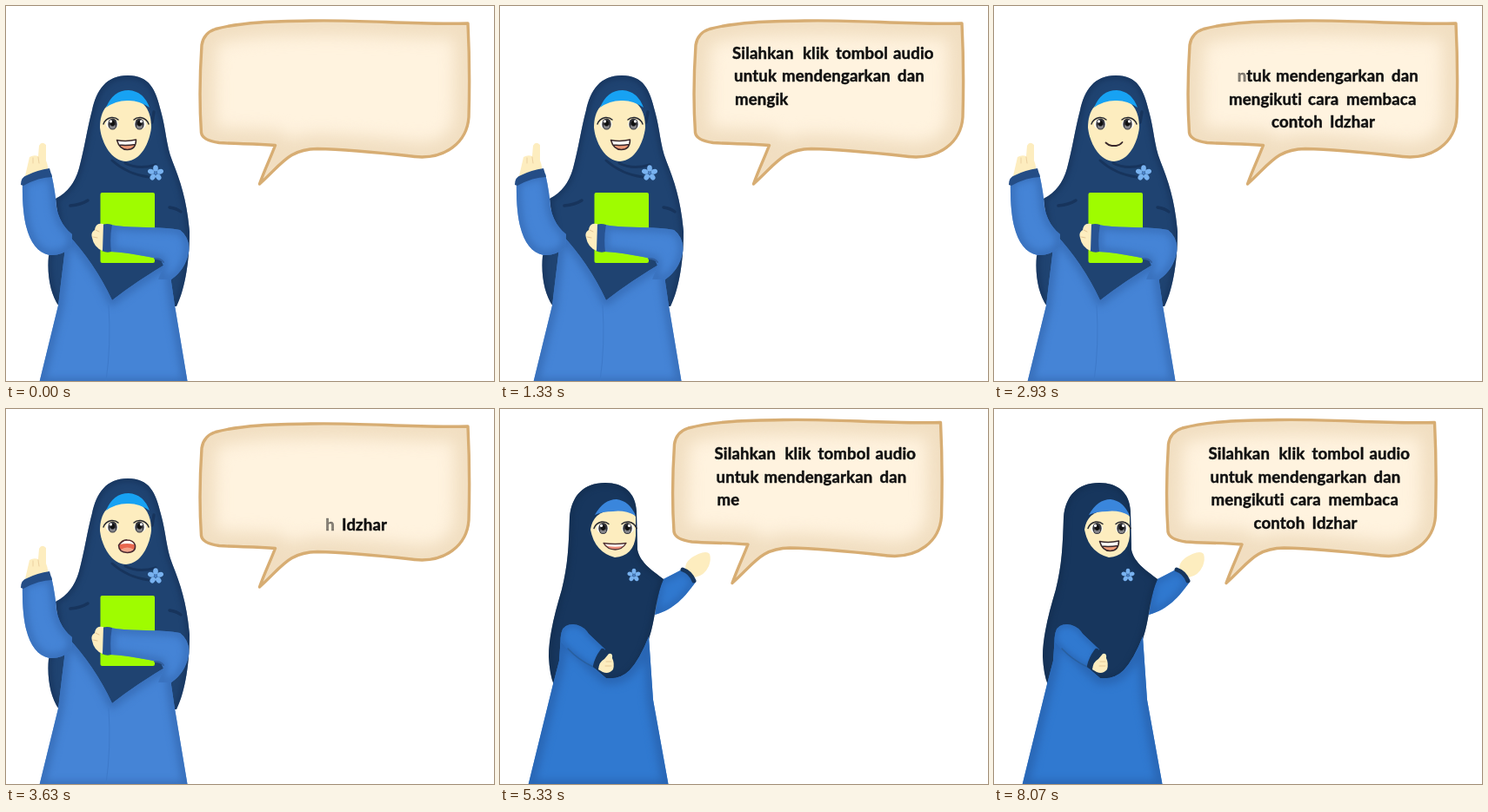
An HTML page that plays this animation: 561x432 px, repeating every 8.11 s.

```html
<!DOCTYPE html>
<html lang="id">
<head>
<meta charset="utf-8">
<style>
html, body { margin: 0; width: 100%; height: 100%; overflow: hidden; background: #fff; }
svg { display: block; width: 561px; height: 432px; }
text { font: 700 18.6px Lato, "Open Sans", sans-serif; letter-spacing: .15px; fill: #111; stroke: #111; stroke-width: .45px; stroke-linejoin: round; }
</style>
</head>
<body>
<svg id="stage" viewBox="0 0 561 432" fill="none" stroke-linecap="round" stroke-linejoin="round"></svg>
<script>
const LOOP = 8110, SWITCH = 3740, SKIN = '#fdedbf', INK = '#24262e';
let clips = 0;

const shape = (d, fill) => `<path d="${d}" fill="${fill}"/>`;
const line = (d, color, width) => `<path d="${d}" stroke="${color}" stroke-width="${width}"/>`;
const oval = (x, y, rx, ry, fill) => `<ellipse cx="${x}" cy="${y}" rx="${rx}" ry="${ry}" fill="${fill}"/>`;

// A filled shape with a blurred darker rim
function soft(d, fill, rim, width = 12, blur = 4) {
  const id = 'clip' + clips++;
  return `<clipPath id="${id}"><path d="${d}"/></clipPath>${shape(d, fill)}
    <g clip-path="url(#${id})"><path d="${d}" stroke="${rim}" stroke-width="${width}" style="filter:blur(${blur}px)"/></g>`;
}

function flower(x, y, r) {
  let petals = '';
  for (let i = 0; i < 5; i++)
    petals += `<ellipse cy="${-r * .62}" rx="${r * .32}" ry="${r * .42}" fill="#78b2f0" transform="rotate(${i * 72})"/>`;
  return `<g transform="translate(${x} ${y})">${petals}<circle r="${r * .2}" fill="#4c83c8"/></g>`;
}

function eyes(left, right, y) {
  const open = (x, s) => `<g transform="translate(${x} ${y}) scale(${s} 1)">
    ${oval(0, .5, 7, 6, '#fffdf7')}${oval(.5, .5, 5.2, 6.6, '#33343b')}${oval(.5, 3.2, 3.4, 2.8, '#85858a')}
    ${oval(.5, -.3, 2.6, 3.2, '#111')}${oval(-1.5, -2.6, 1.6, 1.6, '#fff')}
    ${line('M-10 .5Q-8 -5.5 -1 -7Q4 -7.5 7 -4.5', INK, 1.4)}</g>`;
  const shut = (x, s) => `<g transform="translate(${x} ${y}) scale(${s} 1)">
    ${line('M-10 0Q-1 7 8 1', INK, 1.9)}</g>`;
  return `<g class="open">${open(left, 1)}${open(right, -1)}</g>
    <g class="shut">${shut(left, 1)}${shut(right, -1)}</g>`;
}

const MOUTHS = {
  O: shape('M-11 -4.5Q0 -2.5 11 -5Q11 6.5 1 6.5Q-8 6.5 -11 -4.5Z', '#ef9c78') +
     shape('M-11 -4.5Q0 -2.5 11 -5L10 .5Q0 2 -8.5 1Z', '#fffdf8') +
     line('M-11 -4.5Q0 -2.5 11 -5Q11 6.5 1 6.5Q-8 6.5 -11 -4.5ZM-8.5 1Q0 2 10 .5', '#38272a', 1.5),
  F: shape('M-13.5 -2.5Q0 -.5 12.5 -2.5Q8 5 0 5Q-9 5 -13.5 -2.5Z', '#e98a78') +
     shape('M-13.5 -2.5Q0 -.5 12.5 -2.5L9 1Q0 2.5 -9 1Z', '#fffdf8') +
     line('M-13.5 -2.5Q0 -.5 12.5 -2.5Q8 5 0 5Q-9 5 -13.5 -2.5Z', '#4d3032', 1.3),
  R: shape('M-9 -2Q-4 -9 1 -8Q8 -8 10 -2Q11 6 1 6.5Q-9 6 -9 -2Z', '#e8674f') +
     shape('M-8 -3Q-3 -8 1 -7.5Q7 -7.5 9 -3Q1 -5 -8 -3Z', '#fffdf8') +
     shape('M-7 3Q1 -2 9 3Q6 6.5 1 6.5Q-5 6 -7 3Z', '#f2a48a') +
     line('M-9 -2Q-4 -9 1 -8Q8 -8 10 -2Q11 6 1 6.5Q-9 6 -9 -2Z', '#4a2a30', 1.5),
  C: line('M-10 -1.5Q-7 1.5 -3 2L2 2Q6 1.5 9 -2', '#38272a', 1.8)
};
const mouths = (x, y) => `<g transform="translate(${x} ${y})">` +
  Object.keys(MOUTHS).map(k => `<g class="mouth" data-kind="${k}">${MOUTHS[k]}</g>`).join('') + '</g>';

const BUBBLE = 'M225 45Q227 31 241 26.5C270 18.5 310 17.5 350 17C410 15.5 470 22 531 20' +
  'C533 60 533 95 532 128C530 157 505 177 470 173.5C430 169 395 165 358 164.500' +
  'C325 165 318 181 291.500 205C298 187 304 175 309.500 160.500C285 158.500 265 159 245 157.500' +
  'Q226 155 224.500 146C222 110 223 75 225 45Z';
const speech = soft(BUBBLE, '#fff3df', '#f1dec1', 34, 9) + line(BUBBLE, '#d7ad73', 3.4);

function pointing() {
  const navy = '#1f4371', fold = '#17345c', blue = '#4584d6', rim = '#386fba';
  return soft('M140 80C115 80 104 97 99 120C94 138 90 165 84 187Q77 212 57 222L62 262L49 288' +
      'C47 310 51 332 61 346L120 345L196 346C204 330 211 300 211 260C208 225 201 203 191 178' +
      'C184 160 184 142 178 121C172 96 165 80 140 80Z', navy, fold, 6, 3) +
    line('M122 178Q140 194 164 197M137 181Q152 189 172 183', fold, 3) +
    line('M74 230Q86 229 94 224M188 232Q196 233 201 237M170 122L168 134', fold, 3.5) +
    soft('M70 262Q102 296 122 339Q150 317 189 294L190 318L194 345L209 435H38L60 345Z', blue, rim) +
    line('M118 345Q121 390 115 432', '#3d79c9', 1) +
    shape('M108 140C108 120 117 107 139 106C159 106 167 121 167 140C165 158 155 178 138 179C122 179 110 159 108 140Z', SKIN) +
    shape('M115 117Q123 97 141 97Q158 98 165 117Q152 108 139 109Q126 109 115 117Z', '#17a2f3') +
    eyes(122, 154, 135.5) + mouths(138.5, 159) + flower(172, 192.5, 9) +
    shape('M21 200Q25 183 27 174Q32 171 37 173L38 161Q41 155 46 160L46 178Q50 187 47 195Z', SKIN) +
    line('M37 174L38 181M31 175L31 181', '#ecd0a0', 1) +
    soft('M19 202Q34 196 52 193Q57 215 58 232Q62 252 76 263L75 278Q64 288 50 287C26 282 18 250 19 202Z', blue, rim, 10) +
    shape('M17 206Q17 197 24 195Q36 189 50 187L53 197Q38 197 20 207Z', '#244d86') +
    '<rect x="108.5" y="215" width="62.5" height="81" rx="2" fill="#9ffc00"/>' +
    soft('M120 252C145 257 175 253 200 258Q212 267 210 284Q206 304 190 315L175 315L181 299L178 292C160 288 140 284 120 283Z', blue, rim, 9) +
    line('M171 291Q178 291 181 295', '#315f9f', 2) +
    shape('M111 252Q116 250 122 252Q119 267 121 283Q116 285 110 282Z', '#285392') +
    shape('M112 251Q103 249 102 258Q97 261 99 267Q101 278 111 282Z', SKIN) +
    line('M103 258L107 260M100 266L105 267', '#e2c394', 1);
}

function offering() {
  const navy = '#17365d', fold = '#132e50', blue = '#3079d0', rim = '#2966b4';
  return soft('M184 198L211 184L225 199C213 216 200 231 178 237Z', blue, rim, 8) +
    shape('M213 184C213 174 222 170 228 167Q238 163 241 167Q243 173 240 181Q235 192 224 194Z', SKIN) +
    line('M210 185Q219 188 223 198', navy, 5) +
    soft('M121 85C96 85 82 100 80 125C79 158 78 180 71 208C63 235 56 262 56 285Q57 306 62 318L130 312' +
      'C155 312 167 280 174 255C179 236 180 213 188 196C178 188 161 178 158 162L157 118C156 96 142 85 121 85Z', navy, fold, 6, 3) +
    soft('M70 260L68 290L61 317L32 435H194L176 335L171 262Q161 288 149 301Q138 312 122 310L108 298Z', blue, rim, 14, 5) +
    soft('M70 268Q68 248 84 248Q96 249 102 259L121 277L109 299Q82 284 70 268Z', blue, rim, 6, 3) +
    line('M78 276Q90 289 107 297', '#285f9f', 1.5) +
    line('M118 279Q112 287 110 296', navy, 6) +
    shape('M113 300Q114 291 120 288L125 282Q130 281 129 287Q132 293 130 300Q125 306 118 303Z', SKIN) +
    line('M122 291L128 291M121 296L128 296', '#e6c998', 1) +
    shape('M104 139Q107 118 130 116Q150 115 156 124L156 146Q154 169 132 171Q109 165 104 139Z', SKIN) +
    shape('M109 122Q119 104 134 104Q149 106 156 123Q143 116 130 118Q118 118 109 122Z', '#3a86dc') +
    eyes(118, 147, 137) + mouths(132.5, 157) + flower(154, 191.5, 7.5);
}

// Each line: baseline, then words with their left edges
const LINES = [
  [60.5, ['Silahkan', 267], ['klik', 348], ['tombol', 386], ['audio', 452]],
  [87, ['untuk', 269], ['mendengarkan', 324], ['dan', 457]],
  [113.5, ['mengikuti', 270], ['cara', 361], ['membaca', 405]],
  [140, ['contoh', 319], ['Idzhar', 386]]
];
let count = 0;
const words = LINES.map(([y, ...row]) => row.map(([word, x]) => {
  const letters = [...word].map(c => `<tspan class="letter" data-i="${count++}">${c}</tspan>`).join('');
  count++; // the gap after a word takes a step too
  return `<text x="${x}" y="${y}">${letters}</text>`;
}).join('')).join('');

const stage = document.getElementById('stage');
stage.innerHTML = `<g id="first">${pointing()}</g><g id="second">${offering()}</g>
  <g id="bubble">${speech}</g><g id="words">${words}</g>`;

const all = s => [...stage.querySelectorAll(s)];
const [first, second, balloon, caption] = ['first', 'second', 'bubble', 'words'].map(id => document.getElementById(id));
const letters = all('.letter'), mouthParts = all('.mouth'), openEyes = all('.open'), shutEyes = all('.shut');
const show = (el, on) => el.setAttribute('display', on ? 'inline' : 'none');

function letterAlpha(t, i) {
  if (t >= SWITCH) return (t - 3774) / 30 > i ? 1 : 0;
  const typed = (t - 28) / 23.4 > i ? 1 : 0;
  const erased = (t - 2532) / 14 - i;
  return typed * Math.max(0, Math.min(1, 1 - erased));
}

function draw() {
  const t = performance.now() % LOOP, late = t >= SWITCH;
  show(first, !late);
  show(second, late);
  balloon.setAttribute('transform', late ? 'translate(-24.5 -4.5)' : '');
  caption.setAttribute('transform', late ? 'translate(-20.5 -2.5)' : '');

  const step = Math.floor((t + 5) / (100 / 3)) % 10;
  const kind = (late ? 'FCOFCROCOR' : 'ORFOCROFCR')[step];
  mouthParts.forEach(m => show(m, m.dataset.kind === kind));

  const beat = t % 800;
  const blink = beat > 270 && beat < 370 && (late || (t > 870 && t < 2500));
  openEyes.forEach(e => show(e, !blink));
  shutEyes.forEach(e => show(e, blink));

  letters.forEach(l => {
    const a = letterAlpha(t, +l.dataset.i);
    l.setAttribute('fill-opacity', a);
    l.setAttribute('stroke-opacity', a);
  });
  requestAnimationFrame(draw);
}
draw();
</script>
</body>
</html>
```
